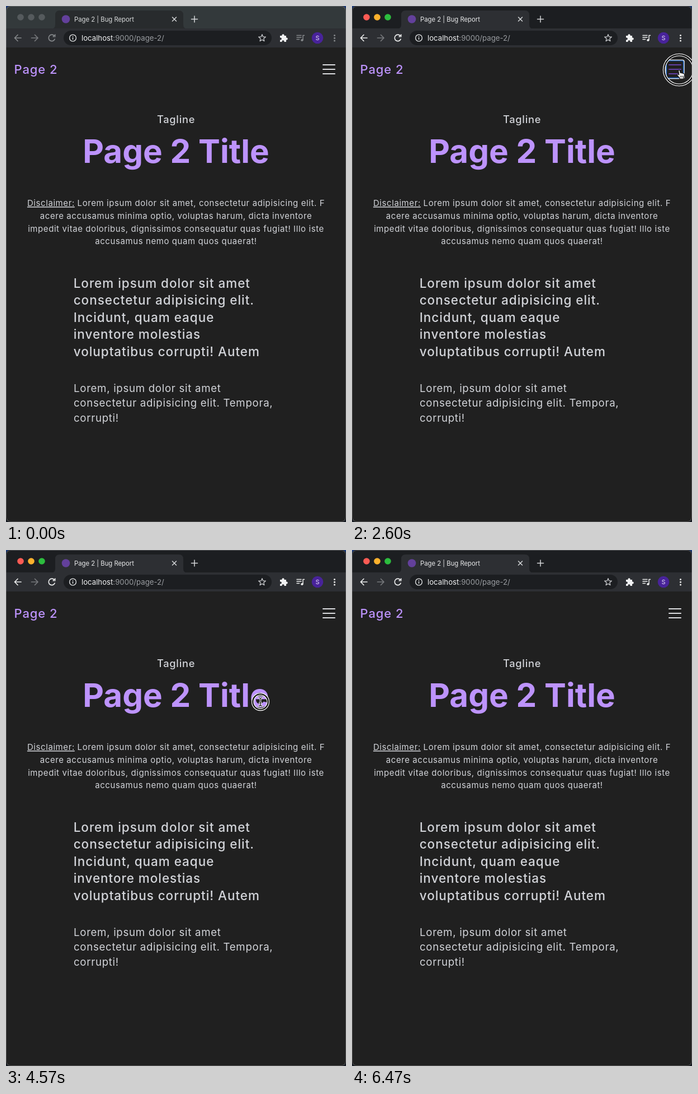
An HTML page that plays this animation: 608 by 921 pixels, repeating every 6.51 s.

```html
<!DOCTYPE html>
<html lang="en">
<head>
<meta charset="utf-8">
<title>Page 2 | Bug Report</title>
<style>
  html, body { margin: 0; width: 100%; height: 100%; overflow: hidden; background: #161a22; }
  svg { display: block; width: 608px; height: 921px; }
  text { font-family: Inter, "Open Sans", sans-serif; font-optical-sizing: none; white-space: pre; }
  .line { fill: none; stroke-linecap: round; stroke-linejoin: round; }
  .frame { fill: #1c1e21; }
  .tab { fill: #2d2f33; }
  .ui { stroke: #eceded; }
  .uifill { fill: #eceded; }
  .tabtext { fill: #e9eaeb; }
  .idle .frame { fill: #33393b; }
  .idle .tab { fill: #282b2d; }
  .idle .light { fill: #555a5d; }
  .idle .ui { stroke: #85888b; }
  .idle .uifill { fill: #85888b; }
  .idle .tabtext { fill: #d9dbdc; }
  .title { fill: #bd93fd; }
  .copy { fill: #d2d4d9; }
  #bars { stroke: #dcdde0; stroke-width: 2; }
  .hover #bars { stroke: #6240a6; }
</style>
</head>
<body>
<svg id="stage" viewBox="0 0 608 921" class="idle">
  <defs><clipPath id="win"><rect width="608" height="921" rx="8"/></clipPath></defs>
  <rect width="608" height="12" fill="#1d3b77"/>
  <g clip-path="url(#win)">
    <rect width="608" height="921" fill="#202020"/>
    <rect class="frame" width="608" height="41"/>
    <path class="tab" d="M80 41Q88 41 88 33V16Q88 8 96 8H309Q317 8 317 16V33Q317 41 325 41Z"/>
    <rect y="40" width="608" height="34" fill="#2d2f33"/>
    <rect x="103" y="44" width="372" height="26" rx="13" fill="#1c1e21"/>
    <circle class="light" cx="26" cy="20" r="5.8" fill="#fc5b54"/>
    <circle class="light" cx="45" cy="20" r="5.8" fill="#fbb12d"/>
    <circle class="light" cx="64" cy="20" r="5.8" fill="#2cbd3e"/>
    <circle cx="107" cy="23.5" r="7.3" fill="#63409b"/>
    <text class="tabtext" x="122" y="27.5" font-size="11.3">Page 2 | Bug Report</text>
    <g class="line" stroke="#d5d7d9" stroke-width="1.5">
      <path d="M297.5 20l7 7m0-7l-7 7"/>
      <path d="M331.5 23.5h11m-5.5-5.5v11"/>
    </g>
    <g class="line" stroke-width="1.7">
      <path class="ui" d="M27 57H15.5m5.5-5.5L15.5 57l5.5 5.5"/>
      <path stroke="#75787b" d="M45.500 57H57m-5.500-5.500L57 57l-5.500 5.500"/>
      <path class="ui" d="M87.200 59.200A5.700 5.700 0 1 1 86.300 53.200"/>
      <path class="ui" stroke-width="1.2" d="M88 51v4h-4z"/>
    </g>
    <circle class="line" cx="119.500" cy="57" r="5.900" stroke="#dfe1e2" stroke-width="1.400"/>
    <path d="M119.500 56.300v3.700m0-6.300v1.500" stroke="#dfe1e2" stroke-width="1.500"/>
    <text x="135" y="61.700" font-size="13.2" fill="#f1f2f3">localhost<tspan fill="#9a9da1">:9000/page-2/</tspan></text>
    <polygon id="star" class="line" stroke="#c9cbce" stroke-width="1.300"/>
    <path fill="#f1f2f3" d="M490 53h3.500a2.100 2.100 0 1 1 4 0h3.500v3.500a2.100 2.100 0 1 1 0 4V64h-3.700a2 2 0 1 0-3.600 0H490v-3.700a2 2 0 1 0 0-3.600z"/>
    <path class="line ui" stroke-width="1.500" d="M520 52.500h8m-8 3.500h8m-8 3.500h4.500m6.500 1.500v-8.500h2.500"/>
    <circle class="uifill" cx="529.300" cy="61" r="2.100"/>
    <circle cx="557" cy="57" r="10.300" fill="#48239a"/>
    <text x="557" y="61" font-size="11" text-anchor="middle" fill="#e6dff5">S</text>
    <g class="uifill">
      <circle cx="587.500" cy="52.500" r="1.500"/>
      <circle cx="587.500" cy="57.300" r="1.500"/>
      <circle cx="587.500" cy="62.100" r="1.500"/>
    </g>
    <g id="focus" fill="none">
      <rect x="561" y="96.500" width="33" height="33" rx="3" stroke="#e8eef8" stroke-width="1.500"/>
      <rect x="562.400" y="97.900" width="30.200" height="30.200" rx="2" stroke="#1763c6" stroke-width="1.400"/>
    </g>
    <path id="bars" class="line" d="M567 105h21M567 113h21M567 121h21"/>
    <rect id="mark" y="224" height="69" fill="#50759f"/>
    <g id="words"></g>
    <rect x=".5" y=".5" width="607" height="920" rx="8" fill="none" stroke="#fff" stroke-opacity=".24"/>
  </g>
  <g id="ring" fill="none">
    <circle stroke="#f2f2f2" stroke-width="4.800"/>
    <circle stroke="#0c0c0c" stroke-width="2.200"/>
  </g>
  <g id="cursor" stroke-linejoin="round">
    <path id="arrow" d="M0 0V14.500L3.400 11.300 5.700 16.700 8.200 15.600 5.900 10.400H10.500Z" fill="#050505" stroke="#fff"/>
    <g id="beam" class="line">
      <path d="M-3-7.500Q0-7.500 0-5V5Q0 7.500-3 7.500M3-7.500Q0-7.500 0-5M0 5Q0 7.500 3 7.500M-1.500 2h3" stroke="#fff" stroke-width="3"/>
      <path d="M-3-7.500Q0-7.500 0-5V5Q0 7.500-3 7.500M3-7.500Q0-7.500 0-5M0 5Q0 7.500 3 7.500M-1.500 2h3" stroke="#111" stroke-width="1.200"/>
    </g>
    <g id="hand">
      <path d="M-1.300 1.300Q0-.8 1.300 1.300L2.200 5.500Q3.800 4.200 4.700 6 6.400 4.900 7.200 6.700 9.300 6 9.400 8.300 9.700 11.500 8 13.500V16H.8V14.300Q-1.500 12-3.300 9.200-3.700 7.300-1.700 7.700L-.2 9Z" fill="#fff" stroke="#080808" stroke-width="1.100"/>
      <path d="M2.200 10.500v3M4.400 10.500v3M6.600 10.500v3" stroke="#080808" stroke-width=".9"/>
    </g>
  </g>
</svg>
<script>
const LOOP = 6510;
const $ = id => document.getElementById(id);
const stage = $('stage');
const svgNS = 'http://www.w3.org/2000/svg';

// Text blocks: style, first baseline, line step, lines
const blocks = [
  { cls: 'title', x: 14.5, y: 121, size: 22, weight: 500, gap: .9, lines: ['Page 2'] },
  { cls: 'copy', x: 304, y: 209, size: 18.3, weight: 500, gap: .7, mid: true, lines: ['Tagline'] },
  { cls: 'title', x: 304, y: 280, size: 58.3, weight: 700, gap: 0, mid: true, lines: ['Page 2 Title'] },
  { cls: 'copy', x: 304, y: 357, step: 22.8, size: 15, weight: 400, gap: .58, mid: true, lines: [
    'Disclaimer: Lorem ipsum dolor sit amet, consectetur adipisicing elit. F',
    'acere accusamus minima optio, voluptas harum, dicta inventore',
    'impedit vitae doloribus, dignissimos consequatur quas fugiat! Illo iste',
    'accusamus nemo quam quos quaerat!'] },
  { cls: 'copy', x: 120.7, y: 503, step: 30.4, size: 22.5, weight: 500, gap: .95, lines: [
    'Lorem ipsum dolor sit amet', 'consectetur adipisicing elit.', 'Incidunt, quam eaque',
    'inventore molestias', 'voluptatibus corrupti! Autem'] },
  { cls: 'copy', x: 121, y: 688.5, step: 26.6, size: 18.7, weight: 400, gap: .68, lines: [
    'Lorem, ipsum dolor sit amet', 'consectetur adipisicing elit. Tempora,', 'corrupti!'] }
];

for (const b of blocks) b.lines.forEach((line, i) => {
  const el = document.createElementNS(svgNS, 'text');
  const attrs = { class: b.cls, x: b.x, y: b.y + i * (b.step || 0), 'font-size': b.size,
    'font-weight': b.weight, 'letter-spacing': b.gap, 'text-anchor': b.mid ? 'middle' : 'start' };
  for (const k in attrs) el.setAttribute(k, attrs[k]);
  const label = line.match(/^Disclaimer:/);
  if (label) {
    const span = document.createElementNS(svgNS, 'tspan');
    span.setAttribute('text-decoration', 'underline');
    span.textContent = label[0];
    el.append(span, line.slice(label[0].length));
  } else el.textContent = line;
  $('words').append(el);
});

$('star').setAttribute('points', Array.from({ length: 10 }, (_, i) => {
  const r = i % 2 ? 2.9 : 6.6, a = i * Math.PI / 5;
  return [458 + r * Math.sin(a), 57.3 - r * Math.cos(a)].map(v => v.toFixed(2));
}).join(' '));

// Pointer path: time, x, y
const path = [
  [60, 614, 640], [640, 590, 150], [780, 585, 114], [3400, 585, 114], [3630, 219, 249],
  [3850, 145, 256], [4030, 160, 262], [4470, 455, 271], [4620, 455, 271], [4930, 200, 219],
  [5080, 182, 210], [5500, 150, 190], [5620, 150, 190], [5850, 110, 170]
];
// Mouse button: down, up
const clicks = [[840, 930], [1240, 1330], [1900, 1990], [2440, 2530], [3000, 3090], [4510, 5040], [5540, 5620]];
const edges = [133, 173, 208, 246, 282, 297, 335, 349, 385, 402, 424, 441, 475];

const within = (t, a, b) => t >= a && t < b;
const show = (id, on) => $(id).setAttribute('visibility', on ? 'visible' : 'hidden');

function pointer(t) {
  const i = path.findIndex((p, k) => k && t < p[0]);
  if (i < 0 || t < path[0][0]) return null;
  const [t0, x0, y0] = path[i - 1], [t1, x1, y1] = path[i];
  const k = (t - t0) / (t1 - t0), e = k * k * (3 - 2 * k);
  return { x: x0 + (x1 - x0) * e, y: y0 + (y1 - y0) * e };
}

function drawRing(t, p) {
  const hit = p && clicks.find(([down, up]) => within(t, down, up + 115));
  show('ring', hit);
  if (!hit) return;
  const k = Math.max(0, (t - hit[1]) / 115);
  const r = k ? 21 + 13 * k : 8 + 13 * Math.min(1, (t - hit[0]) / 100);
  $('ring').setAttribute('transform', `translate(${p.x} ${p.y})`);
  $('ring').setAttribute('opacity', Math.min(1, 2.5 * (1 - k)));
  for (const c of $('ring').children) c.setAttribute('r', r - 2.2);
}

function drawMark(t, p) {
  const on = p && within(t, 4620, 5540);
  let left = 133;
  if (on && t < 4930 && p.y > 224)
    left = edges.reduce((a, b) => Math.abs(b - p.x) < Math.abs(a - p.x) ? b : a);
  show('mark', on);
  $('mark').setAttribute('x', left);
  $('mark').setAttribute('width', 475 - left);
}

function draw(t) {
  const p = pointer(t), active = t >= 840;
  const over = (x0, y0, x1, y1) => !!p && within(p.x, x0, x1) && within(p.y, y0, y1);
  const menu = active && over(561, 96, 595, 130);
  const text = over(133, 224, 475, 293);
  stage.classList.toggle('idle', !active);
  stage.classList.toggle('hover', menu);
  show('focus', within(t, 1240, 4510));
  show('hand', menu);
  show('beam', text);
  show('arrow', p && !menu && !text);
  if (p) $('cursor').setAttribute('transform', `translate(${p.x} ${p.y})`);
  drawMark(t, p);
  drawRing(t, p);
}

const start = performance.now();
function tick() {
  draw((performance.now() - start) % LOOP);
  requestAnimationFrame(tick);
}
tick();
</script>
</body>
</html>
```
